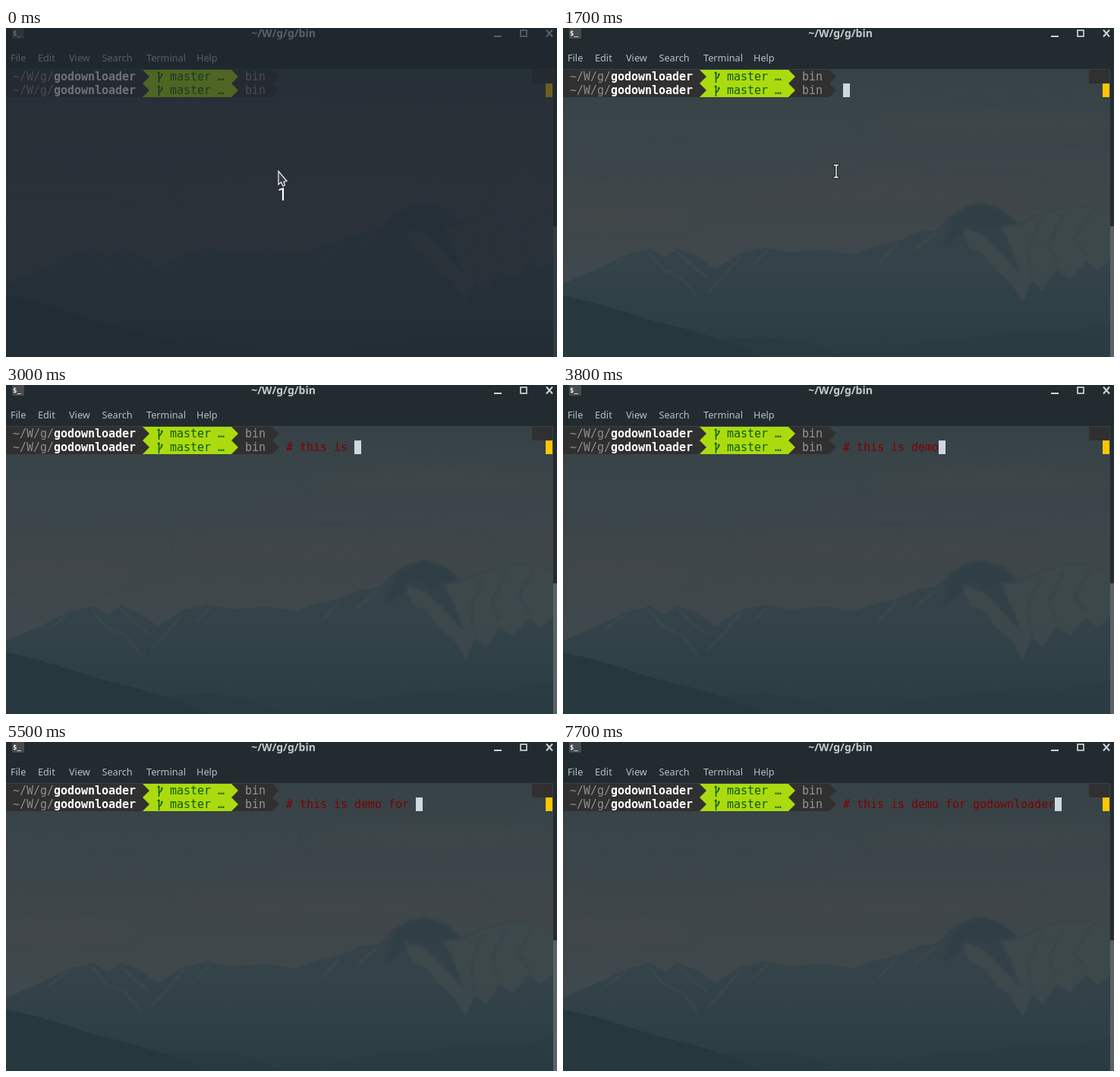
An HTML page for the animation above (8000 ms loop, 726 px wide and 433 px high).

```html
<!DOCTYPE html>
<html lang="en">
<head>
<meta charset="utf-8">
<title>Terminal demo</title>
<style>
  html, body { margin: 0; width: 100%; height: 100%; overflow: hidden; background: #222b2f; }
  svg { display: block; width: 726px; height: 433px; }
  text { white-space: pre; }
  .mono { font: 15px "DejaVu Sans Mono", monospace; letter-spacing: -.03px; }
  .bold { font-weight: 700; }
  .menu { font: 12.7px "Noto Sans", sans-serif; fill: #b6c0c4; }
  .title { font: 700 14px "Noto Sans", sans-serif; fill: #c3cbce; }
  .count { font: 24px Roboto, "Open Sans", sans-serif; fill: #fff; }
</style>
</head>
<body>
<svg viewBox="0 0 726 433" xmlns="http://www.w3.org/2000/svg">
  <defs>
    <linearGradient id="sky" x1="0" y1="54" x2="0" y2="433" gradientUnits="userSpaceOnUse">
      <stop offset="0" stop-color="#364247"/>
      <stop offset=".2" stop-color="#3a4549"/>
      <stop offset=".45" stop-color="#3f464a"/>
      <stop offset=".7" stop-color="#3f484c"/>
    </linearGradient>
    <linearGradient id="rock" x1="0" y1="230" x2="0" y2="433" gradientUnits="userSpaceOnUse">
      <stop offset="0" stop-color="#364349"/>
      <stop offset=".4" stop-color="#344349"/>
      <stop offset=".75" stop-color="#2e3f46"/>
      <stop offset="1" stop-color="#2a3b42"/>
    </linearGradient>
    <filter id="soft" x="-20%" y="-50%" width="140%" height="200%"><feGaussianBlur stdDeviation="9"/></filter>
    <filter id="haze"><feGaussianBlur stdDeviation="1.5"/></filter>
    <clipPath id="pane"><rect y="54" width="721" height="379"/></clipPath>
    <g id="prompt">
      <path d="M0 0H351L360 9L351 18H0Z" fill="#303030"/>
      <path d="M180 0H297L306 9L297 18H180Z" fill="#abdb0f"/>
      <path d="M0 0H180L189 9L180 18H0Z" fill="#303030"/>
      <text class="mono" x="9" y="14" fill="#8d8d8d">~/W/g/</text>
      <text class="mono bold" x="63" y="14" fill="#fff">godownloader</text>
      <path d="M201.5 3V17M201.5 13C202 10 205.500 11 205.500 6" fill="none" stroke="#0a5a0a" stroke-width="1.500"/>
      <path d="M199 5L201.500 2L203 5ZM203.500 7L205.500 4L207 7Z" fill="#0a5a0a"/>
      <text class="mono" x="216" y="14" fill="#0a5a0a">master …</text>
      <text class="mono" x="315" y="14" fill="#949494">bin</text>
    </g>
  </defs>

  <g clip-path="url(#pane)">
    <rect y="54" width="726" height="379" fill="url(#sky)"/>
    <g filter="url(#soft)" opacity=".55">
      <ellipse cx="70" cy="250" rx="100" ry="9" fill="#474b49"/>
      <ellipse cx="150" cy="172" rx="190" ry="9" fill="#38454b"/>
      <ellipse cx="570" cy="125" rx="170" ry="14" fill="#424649"/>
      <ellipse cx="430" cy="215" rx="200" ry="14" fill="#43474b"/>
    </g>
    <path fill="url(#rock)" d="M0 337L45 317L85 298L115 291L135 302L150 291L175 299L200 317L235 296L265 289L300 295L345 291L380 298L410 288L440 281L470 268L490 266L510 248L530 235L552 230L580 239L600 257L625 246L655 237L690 234L726 249V433H0Z"/>
    <g filter="url(#haze)">
      <path fill="#414a4e" opacity=".75" d="M524 262L540 258L562 268L580 260L602 259L627 247L656 238L690 235L726 250V300L704 320L690 306L668 330L650 318L632 346L618 332L606 362L590 335L570 318L552 296L536 290Z"/>
      <path fill="#304047" opacity=".8" d="M512 248L531 236L552 231L580 240L598 259L578 262L592 292L604 326L575 294L552 272L531 265L520 278L500 290Z"/>
      <path fill="none" stroke="#354449" stroke-width="4" opacity=".7" d="M630 252L612 292L618 330M660 245L640 285L650 310M695 243L674 278L690 300"/>
      <path fill="none" stroke="#414b4f" stroke-width="3" opacity=".6" d="M112 294L132 318L158 330L178 356M150 294L174 316L190 328M82 302L55 322M235 299L212 326L190 350M270 292L250 312M440 284L415 312M490 270L462 294"/>
    </g>
    <path fill="#2a3b42" opacity=".65" d="M390 433L440 420L500 410L560 405L610 398L660 401L726 388V433Z"/>
    <path fill="#293a41" d="M190 412L225 408L270 407L310 413L345 423L365 433H190Z"/>
    <path fill="#27373e" d="M0 352L40 361L80 373L120 386L165 397L205 409L245 424L262 433H0Z"/>
  </g>

  <rect width="726" height="54" fill="#222b2f"/>
  <rect x="721" y="54" width="5" height="379" fill="#232d31"/>
  <rect x="721" y="261" width="5" height="172" fill="#586367"/>

  <rect x="8" y="-1" width="16" height="15" rx="1" fill="#484b4c"/>
  <text x="9" y="10" font-family="DejaVu Sans Mono, monospace" font-size="9" font-weight="700" fill="#f2f2f2">$_</text>
  <text class="title" x="365.500" y="12" text-anchor="middle">~/W/g/g/bin</text>
  <g fill="none" stroke="#cdd5d8" stroke-width="2">
    <path d="M643 11H653M712 2.500L720 11.500M720 2.500L712 11.500"/>
    <rect x="678" y="3" width="8" height="8" stroke-width="1.700"/>
  </g>
  <g class="menu">
    <text x="6" y="44">File</text>
    <text x="42" y="44">Edit</text>
    <text x="83" y="44">View</text>
    <text x="126.500" y="44">Search</text>
    <text x="185" y="44">Terminal</text>
    <text x="251" y="44">Help</text>
  </g>

  <use href="#prompt" y="55"/>
  <use href="#prompt" y="73"/>
  <rect x="693" y="55" width="27" height="18" fill="#303030"/>
  <rect x="711" y="73" width="9" height="18" fill="#ffc600"/>

  <text id="typed" class="mono" x="369" y="87" fill="#800000"></text>
  <rect id="cursor" y="73" width="9" height="18" fill="#cfd8dc"/>

  <g id="beam" fill="none" stroke-linecap="square">
    <path d="M357.500 180.500H362.500M360 181V196M357.500 196.500H362.500" stroke="#161b1d" stroke-width="3.500"/>
    <path d="M357.500 180.500H362.500M360 181V196M357.500 196.500H362.500" stroke="#fff" stroke-width="1.400"/>
  </g>

  <g id="countdown">
    <rect width="726" height="433" fill="#1f2730" opacity=".65"/>
    <path d="M359 188.500V206L362.500 203L365 208L367.500 207L366 202.500L370 201.500Z" fill="#3a3f43" stroke="#f4f4f4" stroke-width="1.200"/>
    <text class="count" x="357.500" y="227">1</text>
  </g>
</svg>
<script>
  const LOOP = 8000, CELL = 9, INPUT_X = 369;
  const PHRASE = "# this is demo for godownloader";
  // [time in ms, characters shown]
  const KEYS = [
    [0, 0], [2000, 1], [2100, 2], [2500, 4], [2600, 5],
    [2800, 7], [2900, 8], [3000, 10], [3500, 11], [3600, 12], [3700, 13], [3800, 14],
    [4000, 15], [4500, 16], [4700, 15], [4900, 16], [5000, 17], [5100, 18],
    [5500, 19], [5700, 20], [5800, 21], [6400, 23], [6500, 24],
    [7000, 25], [7100, 27], [7200, 28], [7400, 29], [7500, 30], [7700, 31]
  ];
  const el = id => document.getElementById(id);
  const typed = el("typed"), cursor = el("cursor"), beam = el("beam"), countdown = el("countdown");
  const show = (node, on) => node.setAttribute("visibility", on ? "visible" : "hidden");

  function inputAt(t) {
    let count = 0;
    for (const [time, n] of KEYS) if (t >= time) count = n;
    const text = PHRASE.slice(0, count);
    // a mistyped letter, soon erased
    return t >= 4500 && t < 4700 ? text.slice(0, -1) + "g" : text;
  }

  function draw(t) {
    const text = inputAt(t);
    if (typed.textContent !== text) typed.textContent = text;
    cursor.setAttribute("x", INPUT_X + CELL * text.length);
    show(cursor, t >= 600 && !(t >= 1200 && t < 1700));
    show(beam, t >= 500 && t < 1900);
    show(countdown, t < 500);
  }

  const start = performance.now();
  function tick() {
    draw((performance.now() - start) % LOOP);
    requestAnimationFrame(tick);
  }
  draw(0);
  requestAnimationFrame(tick);
</script>
</body>
</html>
```
